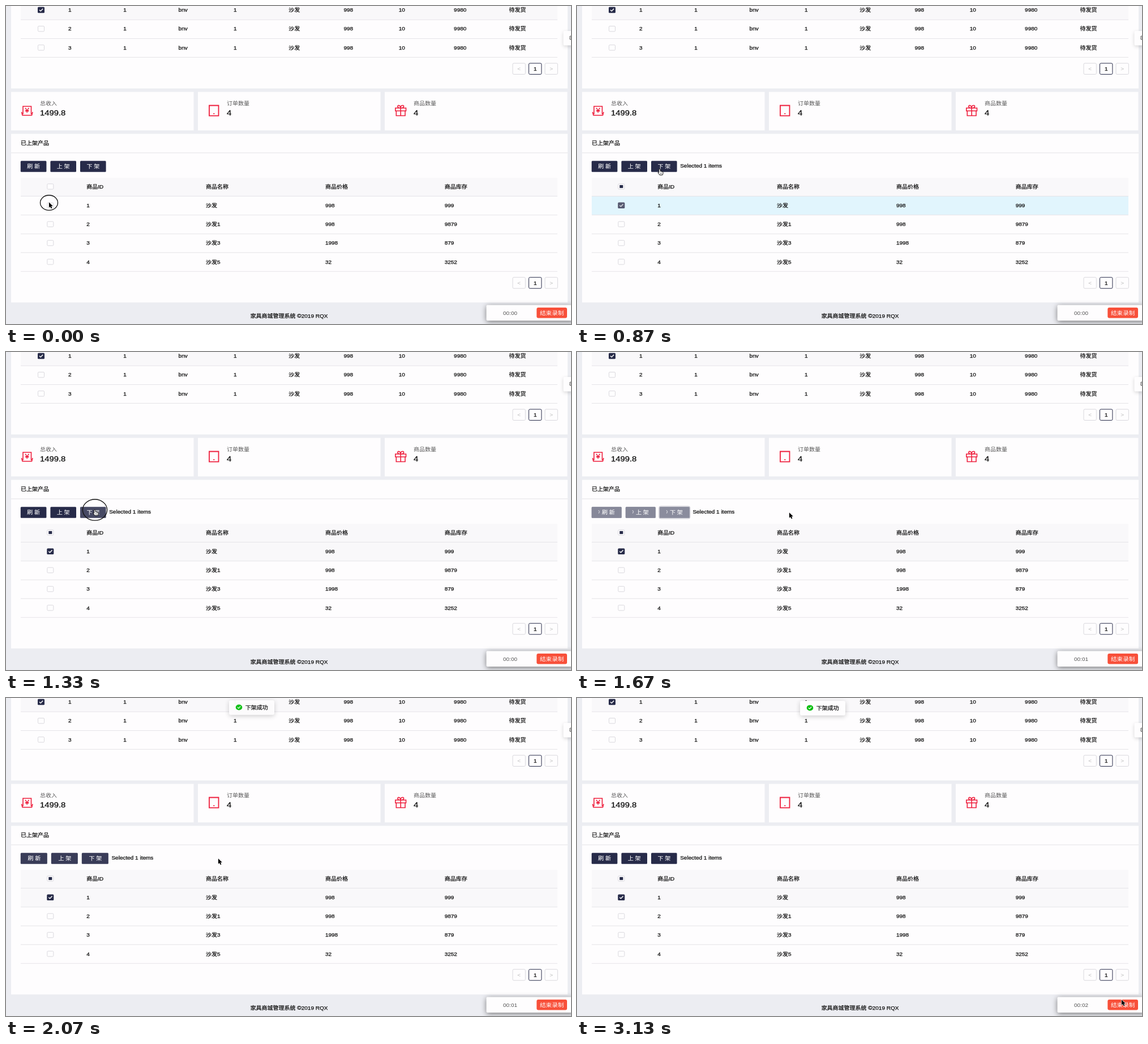
Recreate the animation shown at these times as an HTML page with a canvas. Size 998x561 px, loop 3190 ms.

```html
<!DOCTYPE html>
<html lang="zh">
<head>
<meta charset="utf-8">
<style>
html, body { margin: 0; width: 100%; height: 100%; overflow: hidden; background: #ecedf2; }
canvas { display: block; }
</style>
</head>
<body>
<canvas id="stage" width="998" height="561"></canvas>
<script>
const ctx = document.getElementById('stage').getContext('2d');
const LOOP = 3190, ASPECT = 1.14;
const NAVY = '#272b49', PAPER = '#fefdfe', SHADE = '#f9f8fa', LINE = '#e5e4e8', RED = '#ee1f3d', INK = '#111';

const clamp = v => Math.min(1, Math.max(0, v));
const ramp = (t, a, b) => clamp((t - a) / (b - a));
const smooth = p => p * p * (3 - 2 * p);
const lerp = (a, b, p) => a + (b - a) * p;

function box(x, y, w, h, fill, r = 0, stroke) {
  ctx.beginPath();
  ctx.roundRect(x, y, w, h, r);
  if (fill) { ctx.fillStyle = fill; ctx.fill(); }
  if (stroke) { ctx.strokeStyle = stroke; ctx.lineWidth = 1; ctx.stroke(); }
}

function shadowBox(x, y, w, h, r, blur, alpha) {
  ctx.save();
  ctx.shadowColor = `rgba(0,0,0,${alpha})`;
  ctx.shadowBlur = blur;
  ctx.shadowOffsetY = 2;
  box(x, y, w, h, PAPER, r);
  ctx.restore();
}

function path(d, color, width = 1, fill) {
  const p = new Path2D(d);
  if (fill) { ctx.fillStyle = fill; ctx.fill(p); }
  ctx.strokeStyle = color;
  ctx.lineWidth = width;
  ctx.stroke(p);
}

// The whole screen is slightly wide, so all text shares one aspect.
function text(s, x, y, { size = 8.77, color = INK, align = 'left', heavy = 0.25 } = {}) {
  ctx.save();
  ctx.translate(x, y + size * 0.37);
  ctx.scale(ASPECT, 1);
  ctx.font = `${size}px "Liberation Sans", "Noto Sans CJK SC", "Noto Sans CJK", sans-serif`;
  ctx.textAlign = align;
  ctx.fillStyle = ctx.strokeStyle = color;
  ctx.fillText(s, 0, 0);
  if (heavy) { ctx.lineWidth = heavy; ctx.strokeText(s, 0, 0); }
  ctx.restore();
}

function checkbox(x, y, checked = 0) {
  box(x - 5.5, y - 4.7, 11, 9.4, PAPER, 1.5, '#dad9de');
  if (!checked) return;
  ctx.save();
  ctx.globalAlpha = checked;
  box(x - 6, y - 5.2, 12, 10.4, NAVY, 1.5);
  ctx.translate(x, y);
  path('M-3 0L-.8 2L3.2-2.2', '#fff', 1.5);
  ctx.restore();
}

function pager(y) {
  ['<', '1', '>'].forEach((s, i) => {
    const x = 895 + i * 28.5, on = i === 1;
    box(x, y, 22.4, 19.5, PAPER, 2, on ? NAVY : '#d9d8dd');
    text(s, x + 11.2, y + 10, { align: 'center', color: on ? INK : '#bbb', heavy: on ? 0.25 : 0 });
  });
}

function rule(y, x = 26, w = 948) { box(x, y - 0.5, w, 1, LINE); }

function orders() {
  box(9, -5, 983, 150.5, PAPER);
  box(26, -5, 948, 29, SHADE);
  for (let r = 0; r < 3; r++) {
    const y = 7 + r * 33.2;
    checkbox(62, y, r === 0 ? 1 : 0);
    [r + 1, 1, 'bnv', 1, '沙发', 998, 10, 9980, '待发货']
      .forEach((s, c) => text(s, 110 + c * 97.3, y));
    rule(24.2 + r * 33.2);
  }
  pager(101);
}

function stats() {
  [['总收入', '1499.8'], ['订单数量', '4'], ['商品数量', '4']].forEach(([label, value], i) => {
    const x = 9 + i * 330;
    box(x, 151.5, 322.5, 68, PAPER);
    text(label, x + 51, 172, { color: '#555', heavy: 0 });
    text(value, x + 51, 188, { size: 13, heavy: 0.3 });
  });
  path('M30 191V177H44.5V191M27.5 187L29 192.7H45.5L47 187', RED, 1.6);
  text('¥', 37.3, 184, { size: 11, color: RED, align: 'center', heavy: 0.5 });
  path('M359 175.5H375.5V193.7H359Z', RED, 1.8);
  box(366.3, 189, 2, 1.8, RED);
  path('M687.8 180H706.5V185H687.8ZM689.3 185V193.5H705V185M697.2 180V193.5' +
    'M697 180C690 180 691 174.5 694.3 175.5Q697 176.5 697 180' +
    'C697 176.5 698 175.5 700 175.5C703.5 174.5 704.5 180 697 180', RED, 1.6);
}

function buttons(t) {
  const load = t < 1800 ? smooth(ramp(t, 1430, 1640)) : 1 - smooth(ramp(t, 1855, 2155));
  const hover = ramp(t, 900, 1150) * (1 - ramp(t, 1500, 1700));
  const grow = 7.4 * load, width = 45.6 + grow;
  ['刷 新', '上 架', '下 架'].forEach((s, i) => {
    const x = 25.8 + i * (width + 7);
    if (i === 2 && t > 1450 && t < 1900) box(x - 1, 272, width + 2, 22, null, 3, '#c4c4cd');
    box(x, 273.2, width, 19.6, NAVY, 1.5);
    const lift = i === 2 ? hover * 0.14 : 0;
    box(x, 273.2, width, 19.6, `rgba(255,255,255,${lift + 0.44 * load})`, 1.5);
    text(s, x + width / 2 + 0.43 * grow, 282.3, { color: '#fff', align: 'center', heavy: 0.1 });
    if (load > 0.4) {
      const a = (t - 1670) / 1000 * 2 * Math.PI;
      ctx.beginPath();
      ctx.ellipse(x + 10, 282, 3.6, 3.6, 0, a - 0.9, a + 0.9);
      ctx.strokeStyle = '#fff';
      ctx.lineWidth = 0.8;
      ctx.stroke();
    }
  });
  if (t >= 740) text('Selected 1 items', 182.2 + 3 * grow, 282.2);
}

function products(t) {
  box(9, 225.5, 983, 297.5, PAPER);
  text('已上架产品', 26, 241.5);
  rule(259, 9, 983);
  buttons(t);
  const picked = t >= 740;
  box(26, 303, 948, 32.5, SHADE);
  checkbox(78.3, 318.5);
  if (picked) box(75.3, 315.9, 6, 5.2, NAVY);
  ['商品ID', '商品名称', '商品价格', '商品库存'].forEach((s, c) => text(s, 142.3 + c * 210.8, 318.3));
  if (picked) {
    box(26, 335.5, 948, 33, SHADE);
    ctx.globalAlpha = ramp(t, 730, 830) * (1 - ramp(t, 900, 1120));
    box(26, 335.5, 948, 33, '#e1f5fd');
    ctx.globalAlpha = 1;
  }
  rule(335.5);
  [['沙发', 998, 999], ['沙发1', 998, 9879], ['沙发3', 1998, 879], ['沙发5', 32, 3252]].forEach((row, r) => {
    const y = 351.7 + r * 33.2;
    checkbox(78.3, y, r === 0 && picked ? lerp(0.5, 1, ramp(t, 740, 980)) : 0);
    [r + 1, ...row].forEach((s, c) => text(s, 142.3 + c * 210.8, y));
    rule(368.7 + r * 33.2);
  });
  pager(478.7);
}

function message(t) {
  const p = ramp(t, 1870, 2170);
  if (!p) return;
  const left = (1 - p) ** 3;
  ctx.save();
  ctx.globalAlpha = 1 - left;
  ctx.translate(0, -27 * left);
  shadowBox(394, 5, 80, 25.7, 3, 9, 0.2);
  ctx.beginPath();
  ctx.ellipse(411.5, 17.4, 5.8, 5, 0, 0, 7);
  ctx.fillStyle = '#0bbf12';
  ctx.fill();
  path('M408.8 17.3L410.9 19.2L414.2 15.5', '#fff', 1.2);
  text('下架成功', 422.7, 17.6);
  ctx.restore();
}

function recorder(t) {
  shadowBox(984.5, 44, 20, 25.5, 2, 6, 0.16);
  path('M998 53.2H996.5Q995 54.5 996.8 56Q995 57.5 996.5 59H998', '#333', 1);
  shadowBox(848.5, 527.5, 155, 27.5, 2, 10, 0.5);
  const seconds = (t >= 1500) + (t >= 2500);
  text('00:0' + seconds, 878, 541.7, { color: '#555', heavy: 0 });
  box(937.3, 532, 53.7, 18.5, '#f8503a', 3);
  text('结束录制', 964.2, 541.4, { size: 9.3, color: '#fff', align: 'center', heavy: 0 });
}

// [start, end, x, y]: each move starts where the last one ended
const MOVES = [[500, 840, 146, 287.5], [900, 1270, 157, 278], [1470, 1660, 375, 283.5],
  [2230, 2650, 905, 475.5], [2700, 3060, 962, 532.5]];

function pointer(t) {
  let x = 76, y = 346.5;
  for (const [a, b, toX, toY] of MOVES) {
    const p = smooth(ramp(t, a, b));
    x = lerp(x, toX, p);
    y = lerp(y, toY, p);
  }
  ctx.save();
  ctx.translate(x, y);
  ctx.lineJoin = 'round';
  if (t > 800 && t < 1530) {
    path('M-1.3 .8Q0-.8 1.2 .8V4.2Q2.2 3.6 3 4.6Q4 4 4.6 5Q5.8 4.6 6 6V8L5 10.6H0L-3 6.6Q-3.2 5.2-1.3 6.4Z',
      '#111', 1, '#fff');
    path('M1.4 6.5V9M3.3 6.5V9', '#111', 0.6);
  } else {
    path('M0 0V9L2.1 7.2L3.6 10.6L5.3 9.9L3.8 6.6L6.6 6.5Z', '#fff', 1.4, '#000');
    path('M0 0V9L2.1 7.2L3.6 10.6L5.3 9.9L3.8 6.6L6.6 6.5Z', '#000', 0.2, '#000');
  }
  for (const start of [-60, 1325]) {
    const p = (t - start) / 200;
    if (p < 0 || p >= 1) continue;
    const r = 22.3 * (1 - p);
    ctx.beginPath();
    ctx.ellipse(0, 0.6, r, r * 0.86, 0, 0, 7);
    ctx.strokeStyle = '#111';
    ctx.lineWidth = 1.3;
    ctx.stroke();
  }
  ctx.restore();
}

function draw(now) {
  const t = now % LOOP;
  box(0, 0, 998, 561, '#ecedf2');
  orders();
  stats();
  products(t);
  text('家具商城管理系统 ©2019 RQX', 500, 546.7, { align: 'center' });
  message(t);
  recorder(t);
  pointer(t);
}

const begin = performance.now();
function tick() {
  draw(performance.now() - begin);
  requestAnimationFrame(tick);
}
tick();
</script>
</body>
</html>
```
